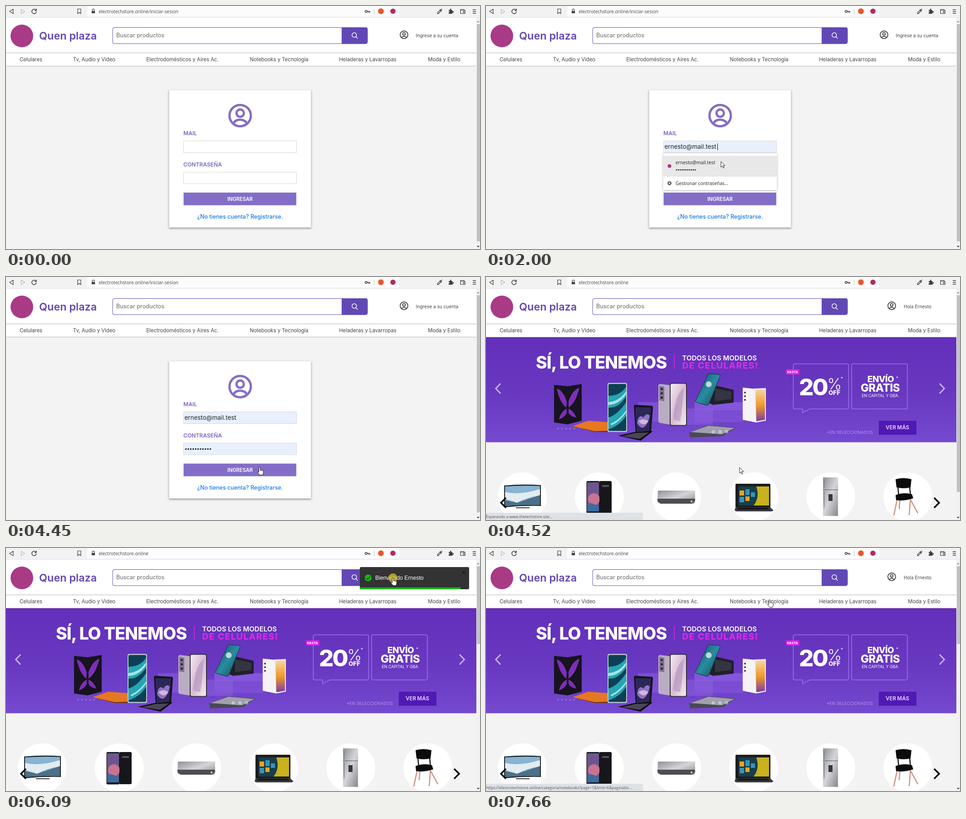
An HTML page for the animation above (8 s loop, 1045 px wide and 536 px high).

```html
<!DOCTYPE html>
<html lang="es">
<head>
<meta charset="utf-8">
<title>Quen plaza</title>
<style>
html, body { margin: 0; width: 100%; height: 100%; overflow: hidden; background: #f3f3f3; }
svg { display: block; width: 100%; height: 100%; }
text { font-family: Inter, "Open Sans", sans-serif; white-space: pre; }
.ui { font-family: "Open Sans", "Noto Sans", sans-serif; }
.mid { text-anchor: middle; }
.line { fill: none; stroke-linecap: round; stroke-linejoin: round; }
.card { filter: drop-shadow(0 2px 2px #0006); }
.pop { filter: drop-shadow(0 1px 2px #0005); }
.dots { stroke: #222; stroke-linecap: round; }
</style>
</head>
<body>
<svg viewBox="0 0 1045 536" preserveAspectRatio="none">
<defs>
  <symbol id="person" viewBox="-26 -26 52 52">
    <g fill="none" stroke="currentColor" stroke-width="5">
      <circle r="23.3"/><circle cy="-5.3" r="8"/><path d="M-15 18Q-11 9 0 9T15 18"/>
    </g>
  </symbol>
  <linearGradient id="sky" x2="0" y2="1">
    <stop stop-color="#632fba"/><stop offset=".55" stop-color="#6838c0"/><stop offset="1" stop-color="#7549d0"/>
  </linearGradient>
  <linearGradient id="steel" x2="1" y2="1">
    <stop stop-color="#8d8f93"/><stop offset=".5" stop-color="#d4d5d8"/><stop offset="1" stop-color="#85878b"/>
  </linearGradient>
  <linearGradient id="teal" x2="1" y2="1">
    <stop stop-color="#0b4a60"/><stop offset=".5" stop-color="#2a8ca0"/><stop offset="1" stop-color="#0b4456"/>
  </linearGradient>
  <linearGradient id="pink" x2="1" y2="1">
    <stop stop-color="#f1ecf2"/><stop offset=".5" stop-color="#d9b9d0"/><stop offset="1" stop-color="#f2ecea"/>
  </linearGradient>
  <linearGradient id="sunset" x2="0" y2="1">
    <stop stop-color="#f4d7a5"/><stop offset=".5" stop-color="#f39a2c"/><stop offset="1" stop-color="#7b3d9c"/>
  </linearGradient>
</defs>

<!-- shared page -->
<rect width="1045" height="536" fill="#f3f3f3"/>
<rect y="26" width="1037" height="107" fill="#fff"/>
<path d="M0 103.5H1037M0 132.5H1037" stroke="#b5b5b5"/>
<circle cx="35" cy="66" r="25" fill="#a93a86"/>
<text x="73" y="74" font-size="23.4" font-weight="600" fill="#5f46b4">Quen plaza</text>
<rect x="235" y="47.5" width="562" height="35.5" rx="4" fill="#fff" stroke="#6148b5"/>
<path d="M740 47h53q4 0 4 4v28.5q0 4-4 4h-53z" fill="#6148b5"/>
<g class="line" stroke="#fff" stroke-width="1.5"><circle cx="767.8" cy="64" r="5"/><path d="M771.5 68l3.5 3.5"/></g>
<text x="243" y="69" font-size="12.7" fill="#666">Buscar productos</text>
<g id="nav" font-size="11.3" fill="#444" class="mid"></g>

<!-- login -->
<g id="login">
  <use href="#person" x="868" y="54" width="19" height="19" color="#444"/>
  <text x="903.5" y="69" font-size="10.1" fill="#444">Ingrese a su cuenta</text>
  <rect class="card" x="359.5" y="185.5" width="313" height="303" fill="#fff" stroke="#ddd" stroke-width=".5"/>
  <use href="#person" x="490" y="215.5" width="52.5" height="52.5" color="#836dc7"/>
  <g font-size="12.1" font-weight="600" fill="#7d66c4">
    <text x="391" y="284.5">MAIL</text><text x="391" y="354">CONTRASEÑA</text>
  </g>
  <g id="fields" stroke="#d8d8d8">
    <rect x="391.5" y="297.5" width="249" height="26"/><rect x="391.5" y="366.5" width="249" height="25.5"/>
  </g>
  <rect x="391.5" y="411.5" width="248.5" height="28" fill="#836dc7" stroke="#c9bfe6" stroke-width=".6"/>
  <text class="mid" x="516" y="429.5" font-size="11.1" font-weight="600" fill="#fff">INGRESAR</text>
  <text class="mid" x="516" y="469" font-size="12.5" font-weight="500" fill="#1579e8">¿No tienes cuenta? Registrarse.</text>
  <g id="filled">
    <text x="393.5" y="315" font-size="13.4" fill="#222">ernesto@mail.test</text>
    <path class="dots" d="M396.5 379.5H452" stroke-width="3.6" stroke-dasharray="0 5.4"/>
  </g>
  <path id="caret" d="M0 303V318" stroke="#111"/>
  <g id="list">
    <rect class="pop" x="390.5" y="325" width="251" height="81" fill="#fff"/>
    <path d="M543 330l3.5-5 3.5 5" fill="none" stroke="#eee"/>
    <rect id="hover" x="390.5" y="330.5" width="251" height="45" fill="#e7e8e7"/>
    <path d="M390.5 375.5h251" stroke="#ddd"/>
    <circle cx="404.5" cy="353" r="4" fill="#a93a86"/>
    <g font-size="10.3" fill="#222">
      <text class="ui" x="418" y="348.5">ernesto@mail.test</text>
      <text class="ui" x="418" y="395">Gestionar contraseñas…</text>
    </g>
    <path class="dots" d="M420 361.5H462" stroke-width="2.8" stroke-dasharray="0 4.12"/>
    <circle cx="404.5" cy="391" r="2.7" fill="none" stroke="#555" stroke-width="2"/>
    <circle cx="404.5" cy="391" r="4.1" fill="none" stroke="#555" stroke-width="1.5" stroke-dasharray="1.6 1.6"/>
  </g>
</g>

<!-- home -->
<g id="home">
  <use href="#person" x="885" y="54" width="19" height="19" color="#444"/>
  <text x="921" y="69" font-size="10.1" fill="#444">Hola Ernesto</text>
  <rect y="133" width="1037" height="231.5" fill="url(#sky)"/>
  <g fill="#8a5ee0">
    <path d="M335 276h50v43h-50zM440 290h60v36h-60z" opacity=".55"/>
    <path d="M460 276h106v18H460z" opacity=".8"/><path d="M460 294h106v26H460z" opacity=".45"/>
  </g>
  <!-- devices -->
  <path d="M150 238l30 3 31-5v81l-31 8-30-4z" fill="#17131f"/>
  <path d="M156 246q14 4 22 28l-1 14q-14-10-21-42zm50-2q-16 6-24 30v14q16-10 24-44zM178 290q-14 8-17 24 12-4 17-14zm4 0q12 6 17 20-12-2-17-10z" fill="#7c2fb8"/>
  <path d="M191 329l34-12 43 3v21l-28 1z" fill="#e87722"/>
  <path d="M191 329l49 11 28-1v3h-28z" fill="#6d3a1e"/>
  <rect x="268" y="233.5" width="43" height="108.5" rx="4" fill="#b9c6cc"/>
  <rect x="270" y="236" width="39" height="103.5" rx="3" fill="#0d4054"/>
  <path d="M270 262q26 0 39-20v22q-18 26-39 24zm0 48q20-6 39-34v30q-14 22-39 30z" fill="#25a5b5"/>
  <path d="M270 276q24-2 39-24v6q-16 24-39 24zm4 48q20-8 35-30v5q-14 20-32 28z" fill="#a5e4e2"/>
  <path d="M326 286q0-4 4-4l34 2q4 0 4 4l-4 53-34 5z" fill="#15131d"/>
  <path d="M329 287l35 1-4 51-28 4z" fill="#2c2856"/>
  <path d="M333 322q4-22 14-12 8-12 14-4-4 20-14 26-8 2-14-10z" fill="#8e74c6"/><path d="M336 318q10-8 22 0-10 14-22 0z" fill="#d6b6dc"/>
  <path d="M291 350l36-8 41-2-27 21z" fill="#0f0f16"/><path d="M299 351l31-7 29-1-20 14z" fill="#4a4656"/>
  <path d="M380 240q0-4 4-4l25 3v87l-25-4q-4-1-4-5z" fill="#b9adc4"/>
  <path d="M382 240l11 2v32l-11-2z" fill="#80738f"/>
  <path class="line" d="M387.5 247v20" stroke="#2b2535" stroke-width="5" stroke-dasharray="0 9.5"/>
  <rect x="405" y="233.5" width="38" height="95" rx="4" fill="#343041"/><rect x="407" y="235.5" width="34" height="91" rx="3" fill="url(#pink)"/>
  <path d="M413 315q2-55 23-70-2 35-8 73z" fill="#a48cc0" opacity=".5"/>
  <path d="M505 239l41 10v28l-46 5-10-5z" fill="#20202a"/><path d="M505 246l36 7v16l-36 5z" fill="#343542"/>
  <path d="M489 216q1-3 4-3l20 2q4 1 3 4l-25 62q-1 3-4 2l-22-6q-4-1-3-4z" fill="url(#teal)" stroke="#17303d"/>
  <circle cx="491" cy="236.5" r="6.5" fill="#b9d9df"/>
  <path d="M566 244l30 3v74l-30-6z" fill="#f5f3f5"/>
  <path d="M571 255v18" class="line" stroke="#38323e" stroke-width="4" stroke-dasharray="0 8"/>
  <path d="M591 246l26-1v72l-22 4z" fill="#eee"/><path d="M594 249l21-2v68l-19 3z" fill="url(#sunset)"/>
  <path d="M448 343l41-16 62 5-29 19-72 3z" fill="#4a4957"/><path d="M451 342l39-14 58 5-28 14z" fill="#a09fae"/>
  <!-- banner copy -->
  <g fill="#fff">
    <text x="110" y="202" font-size="37.6" font-weight="800" letter-spacing="-1">SÍ, LO TENEMOS</text>
    <text x="432.5" y="184" font-size="15" font-weight="600">TODOS LOS MODELOS</text>
    <text x="432.5" y="202" font-size="19.3" font-weight="700" letter-spacing="1.4" fill="#e12be8">DE CELULARES!</text>
    <path d="M415 171.5V203.500" stroke="#d02ae0" stroke-width="1.6"/>
    <g fill="none" stroke="#9c70ea" stroke-width="1.6">
      <path d="M681 191.5h115q3.5 0 3.5 3.5v92.5q0 3.5-3.5 3.5h-82l-16 8v-8h-17q-3.5 0-3.5-3.5v-92.5q0-3.5 3.5-3.5z"/>
      <rect x="806" y="191.5" width="123" height="99.5" rx="3.5"/>
    </g>
    <path d="M661.5 203.5h29v11.5h-29z" fill="#e021e8"/>
    <text class="mid" x="676" y="211.5" font-size="6.3" font-weight="800" letter-spacing=".4">HASTA</text>
    <text x="690" y="260.5" font-size="51" font-weight="800" letter-spacing="-3">20</text>
    <text x="752.5" y="248" font-size="34" font-weight="300">%</text>
    <text x="755" y="260" font-size="13.4" font-weight="800">OFF</text>
    <text x="782" y="228" font-size="10">*</text><text x="904" y="227" font-size="10">*</text>
    <text class="mid" x="870" y="232" font-size="19" font-weight="800" letter-spacing="-.5">ENVÍO</text>
    <text class="mid" x="869" y="253" font-size="24" font-weight="800" letter-spacing="-.5">GRATIS</text>
    <text class="mid" x="868.5" y="265" font-size="8.8">EN CAPITAL Y GBA</text>
    <text x="751" y="346" font-size="9.5" fill="#b092ec">*EN SELECCIONADOS</text>
    <path d="M866 317h83v31h-83z" fill="#5119b3"/>
    <text class="mid" x="907" y="336" font-size="11.4" font-weight="700" fill="#d6c5fa">VER MÁS</text>
    <g opacity=".4"><circle cx="501" cy="341.5" r="3.7"/><circle cx="516" cy="341.5" r="3.7"/><circle cx="530.5" cy="341.5" r="3.7"/></g>
    <path class="line" d="M158.5 334.5h37" stroke="#fff" stroke-width="4.5" stroke-dasharray="0 9" opacity=".2"/>
  </g>
  <path d="M32 235L21.5 246 32 257M1000 235l10.5 11-10.5 11" fill="none" stroke="#c9b7ee" stroke-width="2.8"/>
  <!-- categories -->
  <g id="discs" fill="#fff"></g>
  <path d="M40 460q40-4 81-1v46q-40-1-81 3z" fill="#20262c"/><path d="M42 462q38-3 77-1v42q-38-1-77 2z" fill="#86b4d2"/>
  <path d="M42 474q30 8 77-6v14q-30 4-50 16-16-6-27-8z" fill="#e2ecf2"/><path d="M42 492l26 6 51-17v22q-38-1-77 2z" fill="#4c7088"/>
  <path d="M66 509h30" stroke="#333" stroke-width="2"/>
  <rect x="221.5" y="450" width="29" height="71.5" rx="3" fill="#1c1c24"/><path d="M223 453h26v64h-26z" fill="#6d5590"/>
  <circle cx="238" cy="490" r="13" fill="#c9748f"/><path d="M223 500q12-4 26 8v9h-26z" fill="#3d6aa0"/>
  <rect x="250" y="450" width="27" height="71" rx="3" fill="#16171b"/><path d="M256 461h15" stroke="#555" stroke-width="4"/>
  <path d="M379 471h82v23q0 6-5 6h-73q-5 0-5-6z" fill="url(#steel)"/><path d="M378 489h83v5l-8 6h-68l-7-5z" fill="#4c4d50"/><circle cx="453" cy="495" r="2" fill="#ddd"/>
  <rect x="550" y="456" width="77" height="53" rx="2" fill="#1c1d20"/><path d="M557 462h67v42h-67z" fill="#173f49"/>
  <path d="M596 462h28v42h-34q14-18 6-42z" fill="#c9b21c"/>
  <path d="M559 471h10v11h-10zm13 13h9v10h-9z" fill="#e8a524"/><path d="M572 468h9v13h-9zm-13 17h10v12h-10zm25-10h9v10h-9z" fill="#3794b8"/>
  <path d="M550 508h77l7 7-4 2h-78l-4-2z" fill="#3b3c3f"/><path d="M556 509h65l4 4h-73z" fill="#15161a"/>
  <rect x="743" y="442" width="33" height="85" rx="1" fill="url(#steel)"/>
  <path d="M743 469.5h33" stroke="#55585c" stroke-width="1.2"/><path d="M755 479h9v15h-9z" fill="#35383d"/><path d="M745.5 447v19M745.5 473v35" stroke="#666"/>
  <path d="M907 488l-8 38M936 488l-3 37M913 484l-2 28M932 484l20 37" stroke="#c98f78" stroke-width="2.4" fill="none"/>
  <path d="M903 446q17-5 35 0l-2 18q-15 4-31 0zM903 481q17-7 36-2l3 9q-20 7-38 4z" fill="#0c0c0d"/>
  <path d="M908 463l2 20M934 463l2 20" stroke="#111" stroke-width="2.5"/>
  <path d="M44 487L33 498l11 11M988 487l11 11-11 11" fill="none" stroke="#000" stroke-width="3.5"/>
</g>

<!-- scrollbar -->
<path d="M1037 26h8v510h-8z" fill="#f1f1f1"/>
<rect id="thumb" x="1038" y="40" width="7" fill="#c1c1c1"/>
<path d="M1038 36l3-3.5 3 3.5z" fill="#999"/><path d="M1038 529l3 3.5 3-3.5z" fill="#444"/>

<!-- toast -->
<g id="toast">
  <rect x="780" y="42" width="241" height="49" rx="3" fill="#333"/>
  <rect id="bar" x="780" y="87" height="4" fill="#0fbc0c"/>
  <circle cx="798.5" cy="66" r="7.5" fill="#0fbc0c"/><path d="M794.5 66l3 3 5.5-6" fill="none" stroke="#2b2b2b" stroke-width="1.6"/>
  <text x="814" y="70.3" font-size="12.3" fill="#fff" style="font-family:'Liberation Sans',Arial,sans-serif">Bienvenido Ernesto</text>
  <path d="M1006 51l6 6m0-6l-6 6" stroke="#111" stroke-width="1.2"/>
</g>

<!-- browser bar -->
<path d="M0 0h1045v26H0z" fill="#f2f2f2"/><path d="M0 25.5h1045" stroke="#e6e6e6"/>
<rect x="179" y="-3" width="688" height="26" rx="3" fill="#fcfcfc"/>
<g class="line" stroke="#3c3c3c" stroke-width="1.2">
  <path d="M16 7v10l-8-5z"/><path d="M33.5 7v10l8-5z" stroke="#bbb"/>
  <path d="M66 9a5 5 0 1 0 .8 4M67 6.5v3.5h-3.5" stroke-width="1.5"/>
  <path d="M158 6.5h7V17l-3.5-3-3.5 3z"/>
  <path d="M190 11V9a2.4 2.4 0 0 1 4.8 0v2"/><path d="M189.5 11.5h6v4h-6z" fill="#444"/>
  <circle cx="794" cy="12" r="2.3" stroke-width="1.5"/><path d="M796.5 12h5.5v2.5M799.5 12v2" stroke-width="1.5"/>
  <path d="M811.5 6v12" stroke="#ccc"/>
  <path d="M951 17l1-3 5-5 2 2-5 5zM957 7.5l3.5 3.5M959 9l2-2.5" stroke-width="1.4"/>
  <path d="M976 9h3q-1-3 1.2-3t1.2 3h3v3q3-1 3 1t-3 1.2V17h-8.4v-3q2-.5 2-1.5t-2-1.5z" fill="#3c3c3c" stroke="none"/>
  <path d="M1002 7.5h8v2h2v7h-10zM1008 11.5h4v3h-4zM1002 9.5h8"/>
  <path d="M1029.5 8h6M1029.5 12h6M1029.5 16h6" stroke-width="1.5"/>
</g>
<circle cx="826.5" cy="11.5" r="6.3" fill="#ee5428"/><circle cx="853" cy="11.5" r="5.8" fill="#b52a63"/>
<text id="url" class="ui" x="204.5" y="15.5" font-size="10.2" fill="#444"></text>

<!-- status and pointer -->
<g id="status">
  <path d="M0 520h343q3 0 3 3v13H0z" fill="#dee1e6"/>
  <text id="note" class="ui" x="0" y="532" font-size="8.5" fill="#555"></text>
</g>
<circle id="click" r="10" fill="#c9bd2c" opacity=".8"/>
<g id="cursor" fill="#fff" stroke="#111" stroke-width=".9" stroke-linejoin="round">
  <path id="arrow" d="M0 0v12.5l3-2.7 2 4.7 2-.9-2-4.5h4z"/>
  <path id="beam" d="M-3-7.500h6M0-7.500v15M-3 7.500h6"/>
  <path id="hand" d="M-1.5 1.5q0-1.5 1.4-1.5t1.4 1.5v5q1.5-1 2.5.3 1.5-.8 2.4.5 2-.6 2 1.2v4l-1.5 4.3h-6.5l-4.5-6q-.8-1.8 1-1.6l1.8 1.6z"/>
</g>
</svg>
<script>
const $ = id => document.getElementById(id);
const show = (id, on) => $(id).style.display = on ? '' : 'none';
const during = (t, ...spans) => spans.some(([a, b]) => t >= a && t < b);
const LOOP = 8000, LOADED = 4520, PICKED = 2140;

const menu = [[55, 'Celulares'], [194.5, 'Tv, Audio y Video'], [389, 'Electrodomésticos y Aires Ac.'],
  [602, 'Notebooks y Tecnología'], [797.5, 'Heladeras y Lavarropas'], [966, 'Moda y Estilo']];
$('nav').innerHTML = menu.map(([x, s]) => `<text x="${x}" y="122.3">${s}</text>`).join('');
$('discs').innerHTML = menu.map((_, i) => `<circle cx="${80 + 170 * i}" cy="485" r="54"/>`).join('');

// pointer path: time, x, y
const path = [[120, 956, 453], [190, 890, 355], [250, 830, 262], [640, 830, 262], [900, 735, 246],
  [1280, 594, 307], [1420, 594, 307], [2000, 518, 343], [2100, 520, 341], [2210, 625, 277],
  [2320, 692, 262], [2640, 625, 444], [2840, 548, 424], [4110, 548, 424], [4380, 559, 420],
  [5020, 559, 420], [5480, 795, 168], [5640, 838, 88], [5820, 853, 66], [6570, 853, 66],
  [6720, 915, 56], [6850, 982, 110], [7050, 880, 219], [7390, 625, 114]];

// smooth curve through the keys, never past them
function glide(keys, t, j) {
  const last = keys.length - 1, i = keys.findIndex(k => k[0] > t);
  if (i < 1) return keys[i ? last : 0][j];
  const rate = k => (keys[k][j] - keys[k - 1][j]) / (keys[k][0] - keys[k - 1][0]);
  const slope = k => {
    if (k < 1 || k === last) return 0;
    const u = rate(k), v = rate(k + 1);
    return u * v > 0 ? 2 * u * v / (u + v) : 0;
  };
  const [a, b] = [keys[i - 1], keys[i]], d = b[0] - a[0], p = (t - a[0]) / d, q = 1 - p;
  return a[j] * q * q * (1 + 2 * p) + b[j] * p * p * (3 - 2 * p)
    + d * p * q * (q * slope(i - 1) - p * slope(i));
}

// toast offsets: time, dx
const enter = [[4549, 2250], [4969, -19], [5074, 7.5], [5179, -4], [5249, 0]];
const leave = [[6180, 0], [6320, -18], [6880, 1800]];
const easeOut = p => 1 - (1 - p) ** 3;
const easeBoth = p => 1 - (1 - p ** 1.3) ** 2.4;

function tween(keys, t, ease) {
  const i = keys.findIndex(k => k[0] > t);
  if (i < 1) return keys.at(i)[1];
  const [[t0, a], [t1, b]] = [keys[i - 1], keys[i]];
  return a + (b - a) * ease((t - t0) / (t1 - t0));
}

function draw(t) {
  const home = t >= LOADED, filled = t >= 1770, link = t >= 7590;
  show('login', !home);
  show('home', home);
  $('url').textContent = 'electrotechstore.online' + (home ? '' : '/iniciar-sesion');
  $('thumb').setAttribute('height', !home ? 479 : t < 5200 ? 434 : 172);

  show('filled', filled);
  show('hover', filled);
  $('fields').setAttribute('fill', filled ? '#e8f0fe' : '#fff');
  show('list', during(t, [1490, PICKED]));
  show('caret', during(t, [1490, 2590], [3120, 3650]));
  $('caret').setAttribute('transform', `translate(${filled ? 510.5 : 394.5})`);

  show('status', link || during(t, [LOADED, 4710]));
  $('status').setAttribute('opacity', link && t < 7660 ? .6 : 1);
  $('note').textContent = link
    ? 'https://electrotechstore.online/categoria/notebooks?page=1&limit=6&paginatio...'
    : 'Esperando a www.thetechstore.site...';

  const dx = t < 6000 ? tween(enter, t, easeOut) : tween(leave, t, easeBoth);
  show('toast', during(t, [4549, 6880]));
  $('toast').setAttribute('transform', `translate(${dx})`);
  $('toast').setAttribute('opacity', 1 - Math.max(0, tween([[6320, 0], [6880, 1]], t, easeBoth)));
  const run = Math.min(Math.max(t - 5249, 0), 394);
  $('bar').setAttribute('width', 241 * (1 - run / 5000));

  const at = `translate(${glide(path, t, 1)} ${glide(path, t, 2)})`;
  const hand = during(t, [2760, LOADED], [5640, 6440], [7330, LOOP]), beam = during(t, [1210, 1600]);
  for (const id of ['cursor', 'click']) $(id).setAttribute('transform', at);
  show('cursor', t >= 120);
  show('arrow', !hand && !beam);
  show('beam', beam);
  show('hand', hand);
  show('click', during(t, [1420, 1490], [2070, PICKED], [3650, 3720], [6090, 6160]));
}

const start = performance.now();
function tick() {
  draw((performance.now() - start) % LOOP);
  requestAnimationFrame(tick);
}
tick();
</script>
</body>
</html>
```
